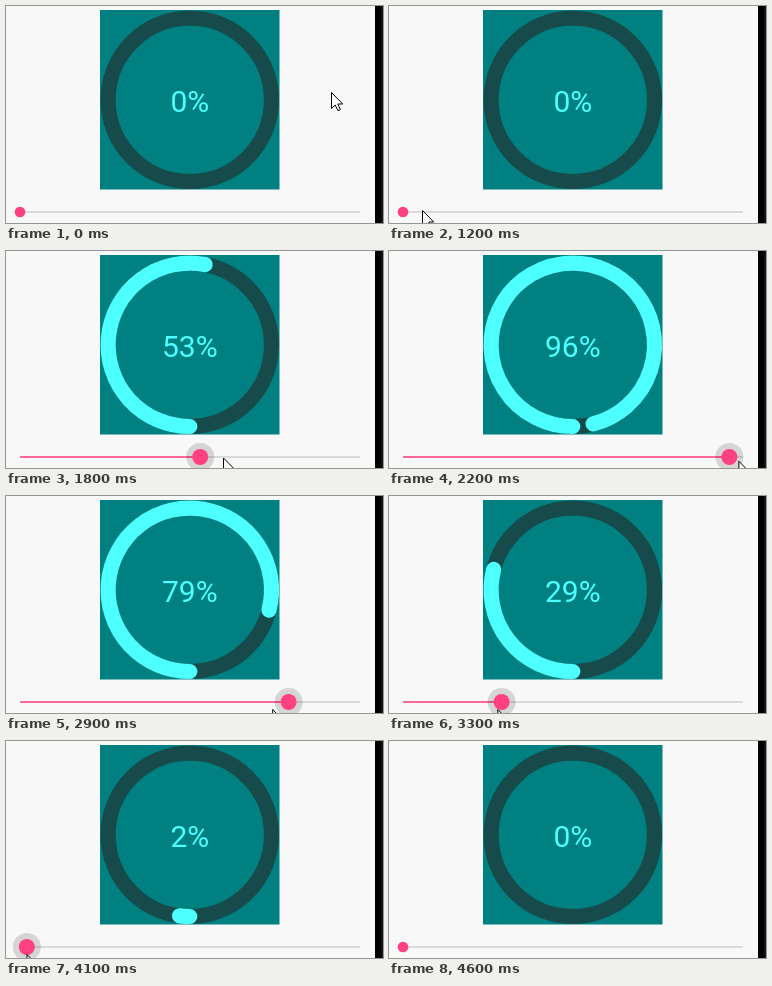
An HTML page that plays this animation: 377 by 217 pixels, repeating every 5.4 s.

```html
<!DOCTYPE html>
<html lang="en">
<head>
<meta charset="utf-8">
<title>Progress ring</title>
<style>
  html, body { margin: 0; width: 100%; height: 100%; overflow: hidden; background: #f8f8f8; }
  svg { display: block; width: 100vw; height: 100vh; }
  text { font: 30px Roboto, sans-serif; fill: #4dffff; text-anchor: middle; }
</style>
</head>
<body>
<svg viewBox="0 0 377 217">
  <defs>
    <linearGradient id="edge">
      <stop offset=".6" stop-color="#000"/>
      <stop offset="1" stop-color="#1c1c1c"/>
    </linearGradient>
  </defs>
  <rect width="377" height="217" fill="#f8f8f8"/>
  <rect x="369" width="8" height="217" fill="url(#edge)"/>

  <rect x="94" y="4" width="179.5" height="179.5" fill="#008080"/>
  <g fill="none" stroke-width="15.2">
    <circle cx="183.8" cy="93.8" r="81.7" stroke="#174b4b"/>
    <path id="arc" stroke="#4dffff" stroke-linecap="round"/>
  </g>
  <text id="label" x="183.8" y="105.7"></text>

  <path d="M14 206H354" stroke="#dadada" stroke-width="1.8"/>
  <path id="done" stroke="#ff6699" stroke-width="2"/>
  <circle id="halo" cy="206" r="14" fill="#000" fill-opacity=".14"/>
  <circle id="thumb" cy="206" fill="#ff4081"/>

  <path id="cursor" d="M.5 .5V16.5L4.2 13L7 18.7L9.4 17.6L6.8 12H11.7Z" fill="#fff" stroke="#000"/>
</svg>
<script>
const LOOP = 5400, STEP = 100;
const CX = 183.8, CY = 93.8, R = 81.7;
const $ = id => document.getElementById(id);
const set = (id, attrs) => {
  for (const key in attrs) $(id).setAttribute(key, attrs[key]);
};

// Sine ease from 0 to 1 between two times, clamped outside them.
function ease(t, from, to) {
  const u = Math.min(1, Math.max(0, (t - from) / (to - from)));
  return (1 - Math.cos(Math.PI * u)) / 2;
}

// One drag up, then a fast and a slow drag back, and a last nudge to zero.
const percent = t =>
  100 * ease(t, 1200, 2350) - 74 * ease(t, 2620, 3400)
  - 23 * ease(t, 3300, 3960) - 3 * ease(t, 4050, 4200);

const sliderX = p => 14 + 3.4 * p;

// The pointer runs slightly ahead of the thumb it drags.
function pointer(t) {
  if (t < STEP) return [325, 86];
  const approach = 12 * (1 - ease(t, 400, 900));
  const grab = 15 * (ease(t, 900, 1200) - ease(t, 1200, 1800));
  const x = sliderX(percent(t + 40)) + 3 + approach + grab;
  const enter = 36 * (1 - ease(t, 200, 500));
  const y = 204 + enter + 9 * ease(t, 1200, 2900) + 27 * ease(t, 4100, 4300);
  return [x, y];
}

// The arc starts at the bottom and runs clockwise.
function arcPath(p) {
  if (p <= 0) return '';
  const a = Math.min(p, 99.99) / 50 * Math.PI;
  const x = CX - R * Math.sin(a), y = CY + R * Math.cos(a);
  return `M${CX} ${CY + R}A${R} ${R} 0 ${p > 50 ? 1 : 0} 1 ${x} ${y}`;
}

function draw(time) {
  const t = Math.floor(time % LOOP / STEP) * STEP;
  const p = Math.abs(Math.round(percent(t)));
  const held = ease(t, 1200, 1300) - ease(t, 4100, 4500);
  const x = sliderX(p);
  set('arc', { d: arcPath(p) });
  $('label').textContent = p + '%';
  set('done', { d: p ? `M14 206H${x}` : '' });
  set('halo', { cx: x, opacity: held });
  set('thumb', { cx: x, r: 5.3 + 2.7 * held });
  set('cursor', { transform: `translate(${pointer(t)})` });
}

const start = performance.now();
function tick(now) {
  draw(Math.max(0, now - start));
  requestAnimationFrame(tick);
}
draw(0);
requestAnimationFrame(tick);
</script>
</body>
</html>
```
